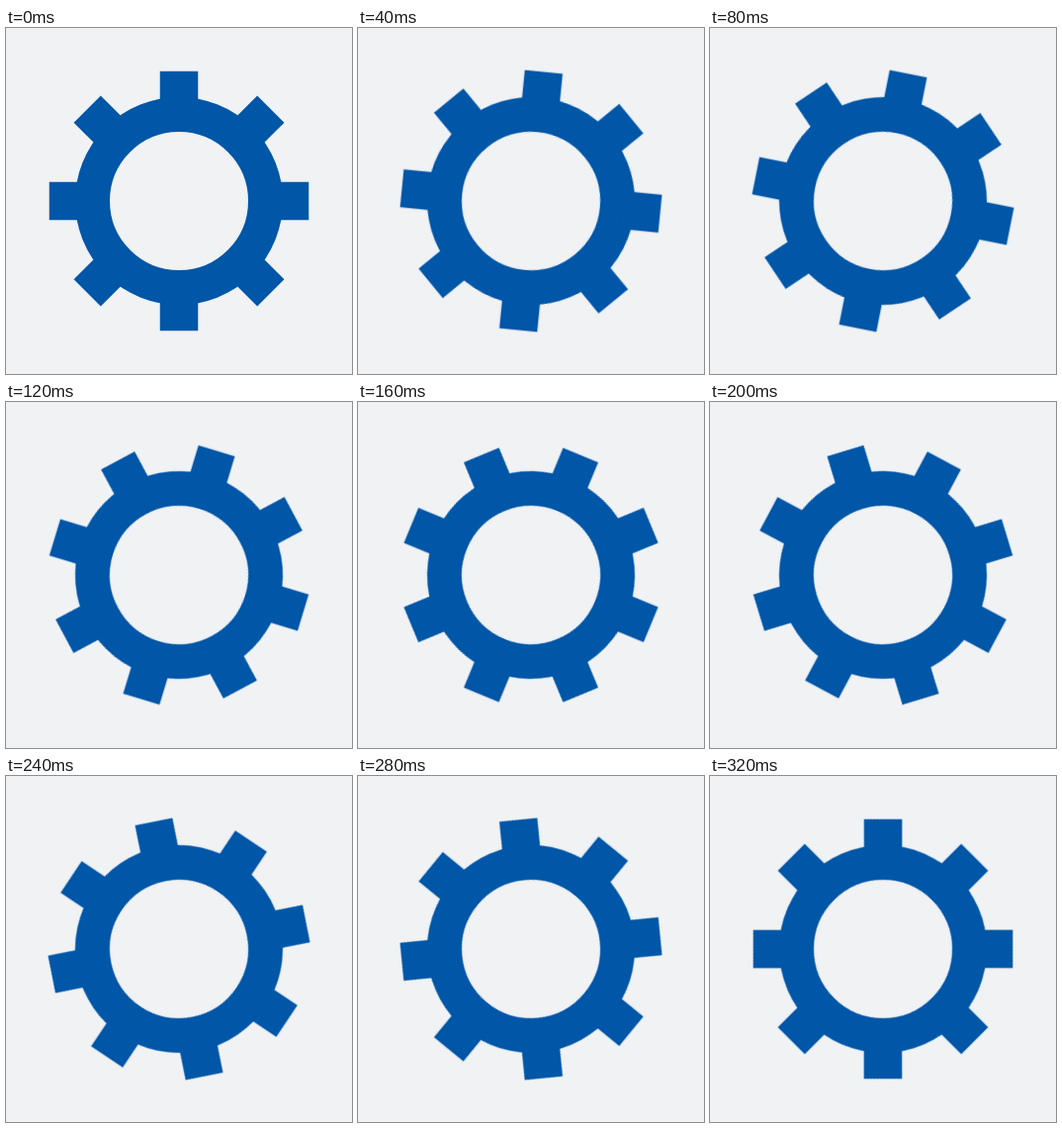
Animation, 350 px wide and 350 px high, one loop 0.36 s. Source, as an HTML page without scripts:

```html
<!DOCTYPE html>
<html lang="en">
<head>
<meta charset="utf-8">
<title>Turning gear</title>
<style>
  html, body {
    margin: 0;
    width: 100%;
    height: 100%;
    overflow: hidden;
    background: #f0f2f4;
  }
  svg {
    display: block;
    width: 100%;
    height: 100%;
  }
  /* One loop turns the gear by one tooth; first and last pose look alike. */
  .gear {
    fill: #0056a7;
    animation: turn 360ms steps(9, jump-none) infinite;
  }
  .ring {
    fill: none;
    stroke: #0056a7;
    stroke-width: 35;
  }
  @keyframes turn {
    from { transform: rotate(0deg); }
    to { transform: rotate(45deg); }
  }
</style>
</head>
<body>
<svg viewBox="-175 -175 350 350">
  <defs>
    <g id="pair">
      <rect id="tooth" x="-19.25" y="-131.25" width="38.5" height="40"/>
      <use href="#tooth" transform="rotate(180)"/>
    </g>
  </defs>
  <g class="gear">
    <circle class="ring" r="87.5"/>
    <use href="#pair"/>
    <use href="#pair" transform="rotate(45)"/>
    <use href="#pair" transform="rotate(90)"/>
    <use href="#pair" transform="rotate(135)"/>
  </g>
</svg>
</body>
</html>
```
